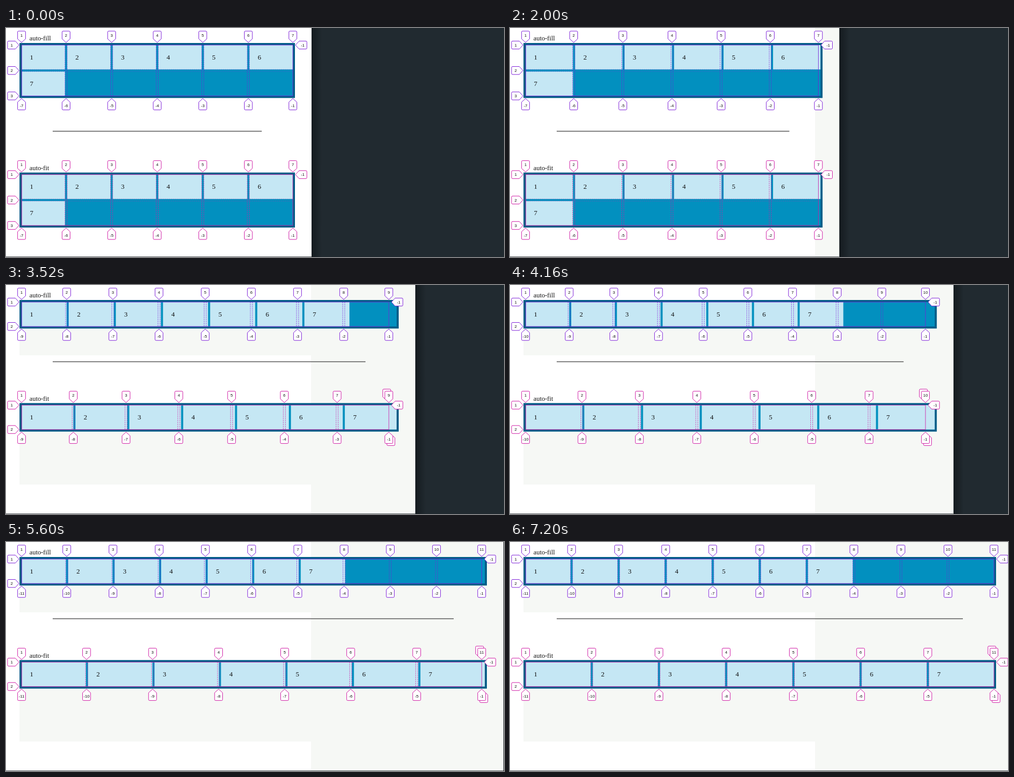
An HTML page with a canvas that plays this animation: 960x443 px, repeating every 7280 ms.

```html
<!DOCTYPE html>
<html lang="en">
<head>
<meta charset="utf-8">
<title>auto-fill and auto-fit</title>
<style>
html, body { margin: 0; width: 100%; height: 100%; overflow: hidden; background: #212a30; }
canvas { display: block; width: 960px; height: 443px; }
</style>
</head>
<body>
<canvas id="stage" width="960" height="443"></canvas>
<script>
const ctx = document.getElementById('stage').getContext('2d');
const LOOP = 7280, STEP = 80;
const LEFT = 30, TOP = 33, BORDER = 4, GAP = 4, MIN_TRACK = 80;
const ROW = 47.2, ROW_PITCH = 51.2, ITEMS = 7;
const START_WIDTH = 589, TINT = '#f6f8f5';

// [time, page width]; the inspector overlay trails the page while it is resized.
const pageKeys = [[1600, 589], [2000, 634.5], [2400, 676], [2880, 738], [3200, 765],
  [3520, 789], [4000, 842], [4800, 905.5], [4880, 911], [5600, 959], [5840, 969]];
const overlayKeys = [[1640, 589], [2000, 630.5], [2400, 660], [2880, 703], [3520, 774],
  [4000, 824], [4880, 895], [5600, 953], [5920, 969]];

function valueAt(keys, t) {
  if (t <= keys[0][0]) return keys[0][1];
  for (let i = 1; i < keys.length; i++) {
    const [t0, v0] = keys[i - 1], [t1, v1] = keys[i];
    if (t < t1) return v0 + (v1 - v0) * (t - t0) / (t1 - t0);
  }
  return keys[keys.length - 1][1];
}

// Mirrors repeat(auto-fill | auto-fit, minmax(80px, 1fr)).
function layout(pageWidth, fit) {
  const width = pageWidth - 66;
  const tracks = Math.floor((width + GAP) / (MIN_TRACK + GAP));
  const cols = fit ? Math.min(tracks, ITEMS) : tracks;
  const rows = tracks < ITEMS ? 2 : 1;
  const y = TOP + (fit ? 250.6 - (2 - rows) * ROW_PITCH : 0);
  return { width, tracks, cols, rows, y, fit, pitch: (width + GAP) / cols,
    height: ROW + (rows - 1) * ROW_PITCH };
}

function rect(x, y, w, h, color) {
  ctx.fillStyle = color;
  ctx.fillRect(x, y, w, h);
}

function text(str, x, y, font, align = 'left') {
  ctx.font = font;
  ctx.textAlign = align;
  ctx.fillStyle = '#111';
  ctx.fillText(str, x, y);
}

function drawGrid(g) {
  text(g.fit ? 'auto-fit' : 'auto-fill', 45.3, g.y - 8.8, '12.8px "Liberation Serif", Times, serif');
  rect(LEFT - BORDER, g.y - BORDER, g.width + 2 * BORDER, g.height + 2 * BORDER, '#035d88');
  rect(LEFT, g.y, g.width, g.height, '#0290bf');
  for (let i = 0; i < ITEMS; i++) {
    const x = LEFT + (i % g.cols) * g.pitch;
    const y = g.y + Math.floor(i / g.cols) * ROW_PITCH;
    rect(x, y, g.pitch - GAP, ROW, '#c5e7f4');
    text(i + 1, x + 16, y + 27.5, '13.3px "Liberation Serif", Times, serif');
  }
}

function line(x0, y0, x1, y1, dash = []) {
  ctx.setLineDash(dash);
  ctx.beginPath();
  ctx.moveTo(x0, y0);
  ctx.lineTo(x1, y1);
  ctx.stroke();
  ctx.setLineDash([]);
}

// Pointed tag outside a grid line; (dx, dy) is the side it sits on.
function tag(str, x, y, dx, dy) {
  ctx.save();
  ctx.translate(x, y);
  ctx.rotate(Math.atan2(dx, -dy));
  ctx.beginPath();
  ctx.moveTo(0, -5);
  ctx.lineTo(-7.7, -12);
  ctx.arcTo(-7.7, -27, 7.7, -27, 2);
  ctx.arcTo(7.7, -27, 7.7, -12, 2);
  ctx.lineTo(7.7, -12);
  ctx.closePath();
  ctx.fillStyle = '#fff';
  ctx.fill();
  ctx.stroke();
  ctx.restore();
  text(str, x + dx * 19, y + dy * 19 + 2.8, '8px "Liberation Sans", Arial, sans-serif', 'center');
}

function drawOverlay(g) {
  const right = LEFT + g.width, bottom = g.y + g.height, dash = [2.5, 1.5];
  ctx.strokeStyle = g.fit ? '#cf1ba5' : '#7d1fd8';
  ctx.lineWidth = 1;

  ctx.globalAlpha = 0.75;
  for (let i = 1; i < g.cols; i++) {
    const x = LEFT + i * g.pitch;
    line(x - GAP, g.y, x - GAP, bottom, dash);
    line(x, g.y, x, bottom, dash);
  }
  if (g.rows === 2) {
    ctx.globalAlpha = 0.35;
    line(LEFT, g.y + ROW, right, g.y + ROW, dash);
    line(LEFT, g.y + ROW_PITCH, right, g.y + ROW_PITCH, dash);
  }
  ctx.globalAlpha = 0.85;
  ctx.strokeRect(LEFT + 0.5, g.y, g.width - 0.5, g.height);
  ctx.globalAlpha = 1;

  if (g.tracks > g.cols) {
    tag('', right - 4, g.y - 4, 0, -1);
    tag('', right + 4, bottom + 4, 0, 1);
  }
  for (let i = 0; i <= g.cols; i++) {
    const last = i === g.cols;
    const x = i === 0 ? LEFT : last ? right : LEFT + i * g.pitch - GAP / 2;
    const index = last ? g.tracks : i;
    tag(index + 1, x, g.y, 0, -1);
    tag(index - g.tracks - 1, x, bottom, 0, 1);
  }
  tag(1, LEFT, g.y, -1, 0);
  if (g.rows === 2) tag(2, LEFT, g.y + (ROW + ROW_PITCH) / 2, -1, 0);
  tag(g.rows + 1, LEFT, bottom, -1, 0);
  tag(-1, right, g.y, 1, 0);
}

function drawPage(width, rows) {
  rect(0, 0, 960, 443, '#212a30');
  const shade = ctx.createLinearGradient(width, 0, width + 20, 0);
  shade.addColorStop(0, 'rgba(10,14,17,.55)');
  shade.addColorStop(1, 'rgba(10,14,17,0)');
  rect(width, 0, 20, 443, shade);

  rect(0, 0, width, 443, '#fff');
  if (width > START_WIDTH) rect(588, 0, width - 588, 443, TINT);
  if (rows === 1) {
    rect(26, 84, 562, 52, TINT);
    rect(26, 284, 562, 102, TINT);
  }
  rect(0, 442, width, 1, '#555b5f');
  rect(90, 198.7 - (2 - rows) * ROW_PITCH + 0.2, width - 186, 1.5, '#555');
}

function draw(t) {
  const page = valueAt(pageKeys, t), seen = valueAt(overlayKeys, t);
  const grids = [false, true].map(fit => layout(page, fit));
  drawPage(page, grids[0].rows);
  grids.forEach(drawGrid);
  [false, true].forEach(fit => drawOverlay(layout(seen, fit)));
}

const start = performance.now();
function tick() {
  const t = (performance.now() - start) % LOOP;
  draw(Math.floor(t / STEP) * STEP);
  requestAnimationFrame(tick);
}
tick();
</script>
</body>
</html>
```
